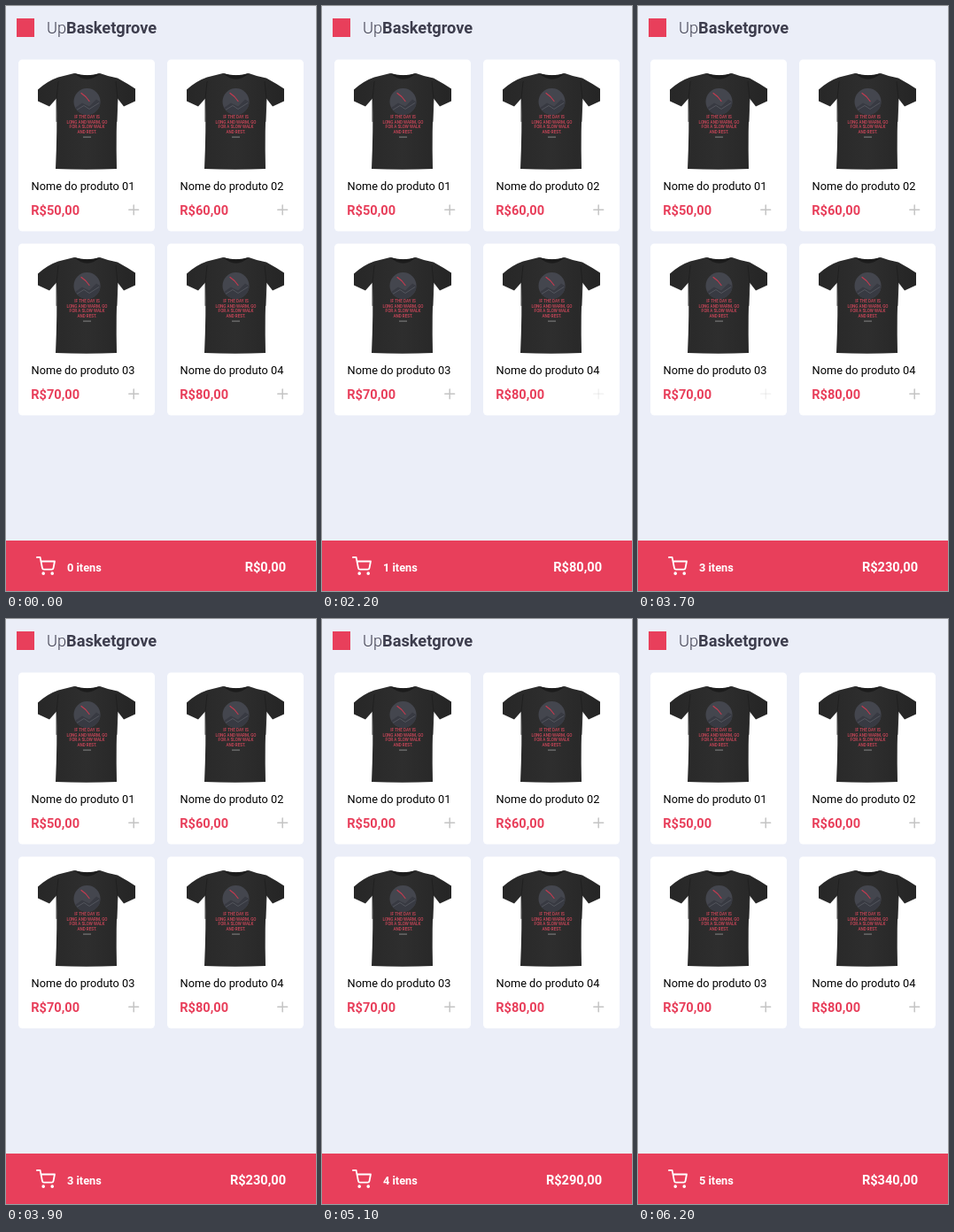
These frames come from a looping animation (350 px wide and 661 px high, 8000 ms). An HTML page with a canvas:

```html
<!DOCTYPE html>
<html lang="pt">
<head>
<meta charset="utf-8">
<style>
  html, body { margin: 0; width: 100%; height: 100%; overflow: hidden; background: #ebeef8; }
  canvas { display: block; width: 350px; height: 661px; }
</style>
</head>
<body>
<canvas id="stage"></canvas>
<script>
const LOOP = 8000, W = 350, H = 661;
const RED = '#e83f5b', PLUS = '#c4c4c4';
const canvas = document.getElementById('stage');
const ratio = window.devicePixelRatio || 1;
canvas.width = W * ratio;
canvas.height = H * ratio;
const ctx = canvas.getContext('2d');

const products = [50, 60, 70, 80].map((price, i) => ({
  title: 'Nome do produto 0' + (i + 1),
  price,
  x: 14 + (i % 2) * 168,
  y: 60.5 + Math.floor(i / 2) * 208
}));

// Each tap dims a plus sign, adds the product and then releases the sign.
const taps = [
  { product: 3, down: 1300, add: 1300, up: 1500 },
  { product: 3, down: 2200, add: 2300, up: 2400 },
  { product: 2, down: 3700, add: 3700, up: 3900 },
  { product: 1, down: 4900, add: 4900, up: 5100 },
  { product: 0, down: 6000, add: 6000, up: 6200 }
];

const cartPath = new Path2D(
  'M1 1h4l2.68 13.39a2 2 0 0 0 2 1.61h9.72a2 2 0 0 0 2-1.61L23 6H6' +
  'M10 21a1 1 0 1 1-2 0a1 1 0 1 1 2 0M21 21a1 1 0 1 1-2 0a1 1 0 1 1 2 0');
const shirtPath = new Path2D(
  'M63 15.5Q78 20 92 15.5Q101 19 112 21Q123 27 132 33V47L119 53L112 44' +
  'Q110 80 111 123.5Q77 125 42 123.5Q44 80 43 44L35 53L22 47V34Q33 24 45 20Z');
const collarPath = new Path2D('M63 15.5Q78 29 92 15.5Q78 20 63 15.5Z');

const money = value => 'R$' + value + ',00';

function text(str, x, y, size, weight, color, align = 'left') {
  ctx.font = `${weight} ${size}px Roboto, sans-serif`;
  ctx.fillStyle = color;
  ctx.textAlign = align;
  ctx.fillText(str, x, y);
  return ctx.measureText(str).width;
}

function box(x, y, w, h, r, color) {
  ctx.fillStyle = color;
  ctx.beginPath();
  ctx.roundRect(x, y, w, h, r);
  ctx.fill();
}

function line(color, width, ...points) {
  ctx.strokeStyle = color;
  ctx.lineWidth = width;
  ctx.beginPath();
  points.forEach(([x, y]) => ctx.lineTo(x, y));
  ctx.stroke();
}

function drawShirt() {
  const cloth = ctx.createLinearGradient(22, 0, 132, 0);
  cloth.addColorStop(0, '#272727');
  cloth.addColorStop(0.5, '#2e2e2e');
  cloth.addColorStop(1, '#252525');
  ctx.fillStyle = cloth;
  ctx.fill(shirtPath);
  ctx.fillStyle = '#1c1c1c';
  ctx.fill(collarPath);
  line('#1d1d1d', 0.8, [45, 25], [43, 44], [43, 70]);
  line('#1d1d1d', 0.8, [110, 25], [112, 44], [111, 70]);

  ctx.save();
  ctx.beginPath();
  ctx.arc(77.5, 47.5, 15, 0, Math.PI * 2);
  ctx.clip();
  ctx.fillStyle = '#44464e';
  ctx.fillRect(62, 32, 31, 31);
  ctx.fillStyle = '#383a42';
  ctx.fill(new Path2D('M62 56L72 49L80 53L88 45L94 49V64H62Z'));
  line('#5a5c64', 0.8, [64, 58], [74, 52], [80, 56], [91, 49]);
  ctx.restore();
  line('#c43b50', 1.2, [71, 38], [76, 42], [80, 47]);

  [['IF THE DAY IS', 66.3], ['LONG AND WARM, GO', 72.2],
   ['FOR A SLOW WALK', 77.8], ['AND REST.', 83.3]]
    .forEach(([str, y]) => text(str, 77.5, y, 4.6, 500, '#d3475b', 'center'));
  box(73, 87, 9, 1.2, 0, '#777777');
}

function drawPlus(x, y, alpha) {
  ctx.globalAlpha = alpha;
  line(PLUS, 1.5, [x - 5.4, y], [x + 5.4, y]);
  line(PLUS, 1.5, [x, y - 5.4], [x, y + 5.4]);
  ctx.globalAlpha = 1;
}

function drawProduct(product, pressed) {
  ctx.save();
  ctx.translate(product.x, product.y);
  box(0, 0, 154, 194, 4.5, '#ffffff');
  drawShirt();
  text(product.title, 14.6, 147.5, 12.76, 400, '#000000');
  text(money(product.price), 14.3, 175.6, 14.58, 700, RED);
  drawPlus(130.2, 169.8, pressed ? 0.22 : 1);
  ctx.restore();
}

function drawFooter(added) {
  const total = added.reduce((sum, tap) => sum + products[tap.product].price, 0);
  box(0, 604, W, 57, 0, RED);
  ctx.save();
  ctx.translate(34, 622);
  ctx.scale(0.911, 0.911);
  ctx.strokeStyle = '#ffffff';
  ctx.lineWidth = 2;
  ctx.stroke(cartPath);
  ctx.restore();
  text(added.length + ' itens', 69, 638.8, 12.76, 700, '#ffffff');
  text(money(total), 316, 639.2, 14.58, 700, '#ffffff', 'right');
}

function draw(time) {
  ctx.setTransform(ratio, 0, 0, ratio, 0, 0);
  ctx.lineCap = ctx.lineJoin = 'round';
  box(0, 0, W, H, 0, '#ebeef8');
  box(12, 14, 20, 21, 0, RED);
  const width = text('Up', 46, 31, 18.22, 300, '#3d3d4d');
  text('Basketgrove', 46 + width, 31, 18.22, 700, '#3d3d4d');

  products.forEach((product, i) => drawProduct(product,
    taps.some(tap => tap.product === i && time >= tap.down && time < tap.up)));
  drawFooter(taps.filter(tap => time >= tap.add));
}

const start = performance.now();
function tick() {
  draw((performance.now() - start) % LOOP);
  requestAnimationFrame(tick);
}
tick();
</script>
</body>
</html>
```
